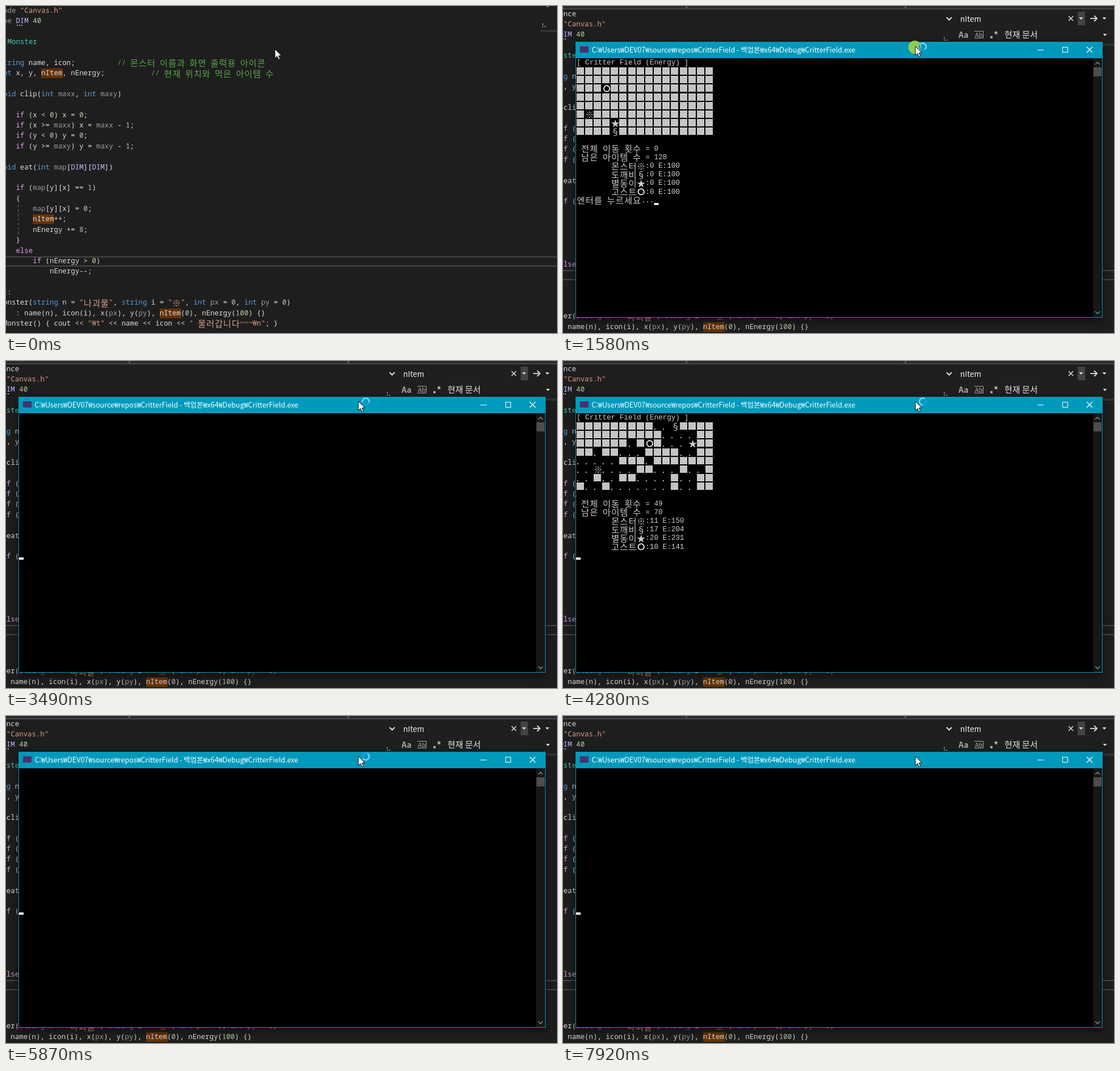
These frames come from a looping animation (971 by 576 pixels, 7990 ms). An HTML page with a canvas:

```html
<!DOCTYPE html>
<html lang="ko">
<head>
<meta charset="utf-8">
<title>Console game</title>
<style>
html, body { margin: 0; width: 100%; height: 100%; overflow: hidden; background: #1e1e1e; }
canvas { display: block; }
</style>
</head>
<body>
<canvas id="stage" width="971" height="576"></canvas>
<script>
const ctx = document.getElementById('stage').getContext('2d');
const SANS = '"Noto Sans CJK KR", "Noto Sans CJK JP", "Noto Sans", sans-serif';
const CODE_FONT = '12.4px "Noto Sans Mono", "DejaVu Sans Mono", monospace';
const TERM_FONT = '12.8px "Liberation Mono", "Noto Sans Mono", monospace';
const LOOP = 7990, TICK = 66;
const START = 2090, ROUND = 45, CLEAR = 0.55;
const CW = 7.58, RH = 15.15;
const CODE_X = -42.2, CODE_Y = 8.5, CODE_CW = 7.45, CODE_RH = 18.37;

const clamp = v => Math.max(0, Math.min(1, v));
const smooth = v => { v = clamp(v); return v * v * (3 - 2 * v); };
const mix = (a, b, p) => a + (b - a) * p;
const hash = n => { const s = Math.sin(n * 12.9898) * 43758.5453; return s - Math.floor(s); };
const isWide = ch => '※§★○'.includes(ch) || ch > '\u2e80';
const columns = str => [...str].reduce((n, ch) => n + (isWide(ch) ? 2 : 1), 0);

function rect(x, y, w, h, color) {
  ctx.fillStyle = color;
  ctx.fillRect(x, y, w, h);
}
function text(str, x, y, color, font) {
  ctx.font = font;
  ctx.fillStyle = color;
  ctx.fillText(str, x, y);
}
function line(color, width, ...pts) {
  ctx.strokeStyle = color;
  ctx.lineWidth = width;
  ctx.beginPath();
  for (let i = 0; i < pts.length; i += 2) ctx.lineTo(pts[i], pts[i + 1]);
  ctx.stroke();
}
function shape(color, ...pts) {
  ctx.fillStyle = color;
  ctx.beginPath();
  for (let i = 0; i < pts.length; i += 2) ctx.lineTo(pts[i], pts[i + 1]);
  ctx.fill();
}
function arc(x, y, r, from, to, color, width) {
  ctx.strokeStyle = color;
  ctx.lineWidth = width;
  ctx.beginPath();
  ctx.arc(x, y, r, from, to);
  ctx.stroke();
}
// Terminal-style text: wide characters take two columns.
function grid(str, x, y, cw, color, font) {
  ctx.textAlign = 'center';
  for (const ch of str) {
    const w = isWide(ch) ? cw * 2 : cw;
    if (ch === '○') arc(x + cw, y, 5.2, 0, 7, '#f0f0f0', 1.8);
    else text(ch, x + w / 2, y, color, w > cw ? '15.3px ' + SANS : font);
    x += w;
  }
  ctx.textAlign = 'left';
}

// ---- editor ----
const source = {
  '-1': '#pragma once',
  0: '#include "Canvas.h"',
  1: '#define DIM 40',
  3: 'class Monster',
  5: '    string name, icon;          // 몬스터 이름과 화면 출력용 아이콘',
  6: '    int x, y, nItem, nEnergy;           // 현재 위치와 먹은 아이템 수',
  8: '    void clip(int maxx, int maxy)',
  10: '        if (x < 0) x = 0;',
  11: '        if (x >= maxx) x = maxx - 1;',
  12: '        if (y < 0) y = 0;',
  13: '        if (y >= maxy) y = maxy - 1;',
  15: '    void eat(int map[DIM][DIM])',
  17: '        if (map[y][x] == 1)',
  18: '        {',
  19: '            map[y][x] = 0;',
  20: '            nItem++;',
  21: '            nEnergy += 8;',
  22: '        }',
  23: '        else',
  24: '            if (nEnergy > 0)',
  25: '                nEnergy--;',
  27: 'public:',
  28: '    Monster(string n = "나괴물", string i = "※", int px = 0, int py = 0)',
  29: '        : name(n), icon(i), x(px), y(py), nItem(0), nEnergy(100) {}',
  30: '    ~Monster() { cout << "₩t" << name << icon << " 물러갑니다~~~₩n"; }'
};
const TOKEN = /(\/\/.*)|("[^"]*")|\b(int|string|void|class|public)\b|\b(if|else)\b|\b(Monster)\b(?!\()|(#\w+|\b(?:maxx|maxy|map|px|py)\b)|\b(DIM)\b|\b(\d+)\b|\w+|\S/g;
const COLORS = ['#57a64a', '#d69d85', '#569cd6', '#d8a0df', '#4ec9b0', '#9a9a9a', '#beb7ff', '#b5cea8'];
const tokens = Object.entries(source).flatMap(([row, str]) =>
  [...str.matchAll(TOKEN)].map(m => ({
    str: m[0], row,
    col: columns(str.slice(0, m.index)),
    color: COLORS[m.slice(1).findIndex(Boolean)] || '#dcdcdc'
  })));

function drawEditor() {
  rect(-10, -30, 1010, 11, '#2b2b2d');
  rect(-10, -20, 1010, 2, '#46464a');
  for (const x of [240, 626]) rect(x, -24, 3, 4, '#55555a');
  for (const y of [441, 457]) rect(-10, y, 1010, 2, '#464646');
  ctx.setLineDash([4, 4]);
  line('#777', 1, 21.5, 350, 21.5, 402);
  ctx.setLineDash([]);
  for (const { str, row, col, color } of tokens) {
    const x = CODE_X + col * CODE_CW, y = CODE_Y + row * CODE_RH;
    if (str === 'nItem') rect(Math.round(x), Math.round(y - 8.5), 38, 17, '#653306');
    grid(str, x, y, CODE_CW, color, CODE_FONT);
  }
  for (let i = 0; i < 3; i++) rect(19 + i * 4, 33, 2, 2, '#aaa');
}

function drawFind() {
  const tri = (x, y) => shape('#ddd', x - 3.5, y - 2, x + 3.5, y - 2, x, y + 2);
  rect(668, 6, 310, 60, '#1f1f1f');
  rect(668, 66, 310, 4, '#323235');
  line('#e0e0e0', 2, 676, 20, 680.5, 24.5, 685, 20);
  text('nItem', 700, 22.5, '#f0f0f0', '13.5px ' + SANS);
  line('#ddd', 1.6, 891, 18, 899, 26);
  line('#ddd', 1.6, 899, 18, 891, 26);
  rect(907, 10, 13, 24, '#434346');
  tri(913, 22);
  tri(954, 22);
  tri(955, 51);
  line('#ddd', 1.8, 929, 22, 941, 22);
  line('#ddd', 1.8, 936, 17, 941, 22, 936, 27);
  text('Aa', 697, 51, '#aaa', 'bold 14px ' + SANS);
  text('Ab', 726, 51, '#aaa', '11px ' + SANS);
  line('#aaa', 1, 725, 44.5, 740.5, 44.5, 740.5, 56.5, 725, 56.5);
  rect(753, 53, 4, 4, '#aaa');
  text('*', 759, 51, '#bbb', 'bold 16px ' + SANS);
  text('현재 문서', 778, 50.5, '#e6e6e6', '15px ' + SANS);
  for (const [x, y] of [[671, 55], [671, 59], [675, 59]]) rect(x, y, 2, 2, '#999');
}

// ---- game ----
const board = [
  '...#####.......#', '...#####.......#', '..####.#.......#', '...##...###...##',
  '.....##..#######', '.......##...#..#', '...........#..##', '#.............##'
];
const foes = [
  { name: '몬스터', icon: '※', start: [1, 5], end: [7, 4], meals: 16 },
  { name: '도깨비', icon: '§', start: [4, 7], end: [11, 7], meals: 24 },
  { name: '별동이', icon: '★', start: [4, 6], end: [11, 3], meals: 29 },
  { name: '고스트', icon: '○', start: [3, 2], end: [1, 3], meals: 15 }
];
const MID = 68;
const id = ([x, y]) => y * 16 + x;
const dist = (a, b) => Math.hypot(a[0] - b[0], a[1] - b[1]);

// Each walker takes the closest free item while drifting to its goal.
function planWalks() {
  const taken = new Set(foes.map(f => id(f.end)));
  const take = (f, kind, pull) => {
    const here = f.walk[f.walk.length - 1];
    let best = null, low = Infinity;
    for (let i = 0; i < 128; i++) {
      const cell = [i % 16, i >> 4];
      if (taken.has(i) || board[cell[1]][cell[0]] !== kind) continue;
      const cost = dist(here, cell) + pull * dist(cell, f.end) + hash(i + 7) * 0.6;
      if (cost < low) { low = cost; best = cell; }
    }
    taken.add(id(best));
    f.walk.push(best);
  };
  for (const f of foes) f.walk = [f.start];
  for (let i = 1; i < 29; i++)
    for (const f of foes) if (i < f.meals) take(f, '.', i / f.meals * 0.3);
  for (const f of foes) f.walk.push(f.end);
  for (let i = 0; i < 8; i++) for (const f of foes) take(f, '#', 0);
}
planWalks();

const mealsAt = (f, r) => r <= MID ? Math.floor(r * f.meals / MID) : f.meals + Math.floor((r - MID) / 8);

function gameAt(r) {
  const eaten = new Set(), spots = new Map();
  const meals = foes.map(f => mealsAt(f, r));
  foes.forEach((f, i) => f.walk.slice(1, meals[i] + 1).forEach(c => eaten.add(id(c))));
  foes.forEach((f, i) => {
    let at = f.walk[meals[i]];
    if (r && meals[i] === mealsAt(f, r - 1)) {
      const x = at[0] + Math.floor(hash(r * 5 + i) * 3) - 1, y = at[1] + Math.floor(hash(r * 9 + i) * 3) - 1;
      if (x >= 0 && x < 16 && eaten.has(id([x, y]))) at = [x, y];
    }
    spots.set(id(at), f.icon);
  });
  return { eaten, spots, meals };
}

// ---- console ----
const term = (str, col, row) => grid(str, 2 + col * CW, 37 + row * RH, CW, '#cccccc', TERM_FONT);

function drawGame(r) {
  const { eaten, spots, meals } = gameAt(r);
  term('[ Critter Field (Energy) ]', 0, 0);
  for (let i = 0; i < 128; i++) {
    const col = i % 16, row = (i >> 4) + 1;
    const x = Math.round(1.6 + col * CW * 2), y = Math.round(30 + row * RH);
    if (spots.has(i)) term(spots.get(i), col * 2, row);
    else if (eaten.has(i)) rect(x + 1, y + 11, 2, 2, '#b8b8b8');
    else rect(x, y, 13, 13, '#c4c4c4');
  }
  term('전체 이동 횟수 = ' + r, 1, 10);
  term('남은 아이템 수 = ' + (128 - eaten.size), 1, 11);
  foes.forEach((f, i) => term(`${f.name}${f.icon}:${meals[i]} E:${100 + 9 * meals[i] - r}`, 8, 12 + i));
}
function drawConsole(t) {
  ctx.shadowColor = 'rgba(0,0,0,.55)';
  ctx.shadowBlur = 16;
  ctx.shadowOffsetY = 5;
  rect(0, 0, 929, 486, '#0099bc');
  ctx.shadowColor = 'transparent';
  rect(1, 29, 927, 456, '#000');
  rect(8, 8, 15, 11, '#4a3070');
  text('C:₩Users₩DEV07₩source₩repos₩CritterField - 백업본₩x64₩Debug₩CritterField.exe', 28.5, 14.5, '#fff', '12.5px ' + SANS);
  rect(814, 14, 11, 1, '#fff');
  ctx.strokeStyle = '#fff';
  ctx.lineWidth = 1;
  ctx.strokeRect(858.5, 9.5, 9, 9);
  line('#fff', 1.2, 901, 9, 911, 19);
  line('#fff', 1.2, 911, 9, 901, 19);
  rect(912, 29, 16, 456, '#171717');
  rect(913, 45, 14, 16, '#4d4d4d');
  line('#8c8c8c', 1.5, 916, 40, 920, 36, 924, 40);
  line('#8c8c8c', 1.5, 916, 475, 920, 479, 924, 475);

  if (t < START) {
    if (t < 780) return;
    drawGame(0);
    term('엔터를 누르세요...', 0, 16);
    return rect(2 + 18 * CW, 284, 8, 3.5, '#fff');
  }
  const n = (t - START) / ROUND, r = Math.floor(n);
  if (n - r > CLEAR) drawGame(r + 1);
  rect(1, 283, 8, 4, '#fff');
}

function drawMouse(t, x, y) {
  if (t > 880 && t < 1640) {
    ctx.fillStyle = 'rgba(156,208,76,.92)';
    ctx.beginPath();
    ctx.arc(x - 1, y + 1.5, 11.5, 0, 7);
    ctx.fill();
  }
  if (t > 650 && t < 6460) {
    const a = t / 160;
    arc(x + 13, y + 0.5, 6, 0, 7, '#1c9be0', 3);
    arc(x + 13, y + 0.5, 6, a, a + 3.6, '#7fd2f5', 2.4);
  }
  ctx.save();
  ctx.translate(x, y);
  ctx.beginPath();
  for (const [px, py] of [[0, 0], [0, 16], [3.7, 12.6], [6.3, 18.3], [8.8, 17.2], [6.3, 11.8], [11.2, 11.5]]) ctx.lineTo(px, py);
  ctx.closePath();
  ctx.fillStyle = '#fff';
  ctx.fill();
  ctx.strokeStyle = '#111';
  ctx.lineWidth = 1;
  ctx.stroke();
  ctx.restore();
}

function draw(now) {
  const t = Math.max(0, 920 + TICK * Math.floor((now % LOOP - 914) / TICK));
  const pan = smooth((t - 62) / 264), reach = smooth((t - 640) / 210), drag = smooth((t - 1380) / 160);
  ctx.textBaseline = 'middle';
  rect(0, 0, 971, 576, '#1e1e1e');

  ctx.save();
  ctx.translate(-24 * pan, 24 * pan);
  drawEditor();
  ctx.restore();

  ctx.save();
  ctx.translate(274 * (1 - pan), -24 * (1 - pan));
  drawFind();
  ctx.restore();

  const show = smooth((t - 650) / 130);
  if (show > 0) {
    const scale = mix(0.92, 1, show);
    ctx.save();
    ctx.globalAlpha = show;
    ctx.translate(mix(11, 22, drag) + 464 * (1 - scale), mix(30, 63, drag) + 243 * (1 - scale));
    ctx.scale(scale, scale);
    drawConsole(t);
    ctx.restore();
  }
  drawMouse(t, mix(474 - 24 * pan, 611, reach) + 10 * drag, mix(76 + 24 * pan, 38, reach) + 33 * drag);
}

const began = performance.now();
function loop() {
  draw(performance.now() - began);
  requestAnimationFrame(loop);
}
loop();
</script>
</body>
</html>
```
